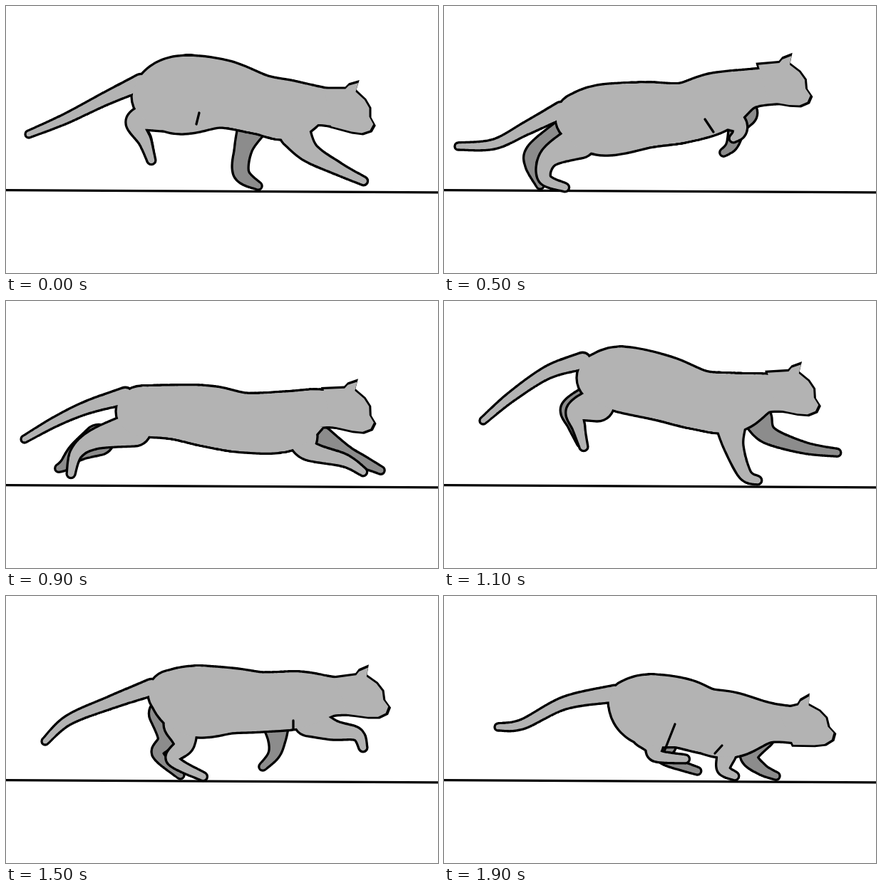
Animation of 606x375 px, one loop 2.2 s. Source, as an HTML page with a canvas:

```html
<!DOCTYPE html>
<html lang="en">
<head>
<meta charset="utf-8">
<title>Running cat</title>
<style>
html, body { margin: 0; width: 100%; height: 100%; overflow: hidden; background: #fff; }
canvas { display: block; }
</style>
</head>
<body>
<canvas id="stage" width="606" height="375"></canvas>
<script>
const STEP = 100, LAST = 1900, LOOP = 2200, HALF_LINE = 1.65;
const COAT = '#b3b3b3', SHADE = '#8c8c8c';

// Half thickness of each part at its joints; a joint may carry its own as a third value.
const HIND = [24, 14, 9, 6], FORE = [22, 14, 9, 6];
const THICKNESS = {
  trunk: [36, 50, 46, 42, 42, 28, 26],
  tail: [5, 7, 9, 12],
  hind: HIND,
  fore: FORE,
  farHind: HIND.map(r => r * 0.9),
  farFore: FORE.map(r => r * 0.9)
};

// Head profile around the skull centre: nape, ear, brow, nose, chin, jaw.
const HEAD = [[-35, -33], [-4, -33], [1, -38], [15, -42], [11, -29], [24, -17], [31, -5],
  [31, 8], [37, 19], [32, 28], [20, 32], [5, 30], [-25, 22]];

// Joints: trunk from rump to neck, tail from the tip, legs from the body to the toe.
// The head is x, y and tilt.
const landing = {
  trunk: [[216, 127, 40], [245, 125, 55], [300, 123, 48], [355, 138], [395, 146], [432, 140]],
  head: [480, 148, 0],
  tail: [[32, 180], [82, 159], [140, 130], [190, 107]],
  hind: [[220, 152], [182, 162], [195, 190], [204, 217]],
  fore: [[405, 178], [425, 205], [465, 228], [502, 246]],
  farHind: [[220, 152], [184, 162], [196, 188], [203, 212]],
  farFore: [[345, 170], [333, 200], [330, 235, 11], [354, 253]],
  folds: [[[267, 166], [271, 150]]]
};
const gathered = {
  trunk: [[228, 137, 30], [265, 133], [320, 138, 50], [372, 150, 45], [405, 155, 38], [440, 137]],
  head: [483, 132, -0.07],
  tail: [[43, 182], [85, 181], [140, 162], [205, 131]],
  hind: [[275, 170], [280, 205], [282, 224], [328, 249]],
  fore: [[365, 175], [345, 204], [325, 209], [301, 206]],
  farHind: [[260, 185], [256, 212], [254, 234], [305, 252]],
  farFore: [[365, 185], [346, 212], [332, 238], [345, 252]],
  folds: [[[306, 182], [299, 156]], [[327, 183], [321, 160]]]
};
const pushing = {
  trunk: [[192, 157], [225, 160], [285, 153], [335, 150], [380, 136], [425, 117]],
  head: [477, 111, -0.09],
  tail: [[20, 197], [70, 194], [115, 172], [165, 146]],
  hind: [[190, 190], [148, 212], [141, 242], [170, 255]],
  fore: [[390, 150], [413, 166, 12], [414, 178], [406, 186]],
  farHind: [[170, 180], [128, 204], [122, 224], [135, 252]],
  farFore: [[420, 150], [412, 168], [404, 195], [392, 206]],
  folds: [[[378, 177], [366, 159]]]
};
const stretched = {
  trunk: [[190, 155], [235, 156, 38], [285, 162, 43], [335, 171], [392, 169], [435, 152]],
  head: [480, 154, -0.04],
  tail: [[26, 194], [72, 168], [115, 149], [168, 133]],
  hind: [[180, 180], [125, 194], [99, 213], [91, 243]],
  fore: [[415, 190], [425, 210], [475, 224], [501, 240]],
  farHind: [[130, 195], [100, 212], [84, 229], [74, 235]],
  farFore: [[440, 195], [475, 215], [505, 228], [526, 238]],
  folds: []
};
const reaching = {
  trunk: [[222, 108], [250, 110, 46], [305, 122], [358, 139], [403, 143], [447, 130]],
  head: [489, 130, -0.06],
  tail: [[55, 168], [95, 134], [146, 100], [195, 84]],
  hind: [[215, 145], [185, 155], [189, 178], [196, 205]],
  fore: [[402, 170], [406, 203], [422, 243], [440, 252]],
  farHind: [[205, 140], [176, 152], [182, 175], [192, 200]],
  farFore: [[440, 165], [455, 188], [505, 206], [552, 213]],
  folds: []
};
const striding = {
  trunk: [[232, 137, 33], [265, 148], [315, 147], [360, 149], [412, 146, 40], [455, 141]],
  head: [499, 142, -0.13],
  tail: [[55, 204], [88, 174], [148, 149], [205, 128]],
  hind: [[245, 180], [250, 208], [234, 230], [277, 254]],
  fore: [[425, 175], [458, 188], [492, 194], [501, 213]],
  farHind: [[222, 165], [226, 200], [213, 222], [245, 252]],
  farFore: [[378, 175], [380, 200], [376, 222], [360, 240]],
  folds: [[[403, 186], [403, 175]]]
};
const crouched = {
  trunk: [[262, 149, 32], [288, 160], [330, 164, 49], [365, 175, 46], [402, 181, 46], [455, 178]],
  head: [508, 183, -0.24],
  tail: [[76, 184], [110, 180], [170, 150], [240, 137]],
  hind: [[285, 190], [294, 208], [298, 224], [339, 229]],
  fore: [[395, 205], [396, 222], [392, 243], [408, 253]],
  farHind: [[305, 206], [303, 215], [312, 230], [356, 246]],
  farFore: [[445, 195], [428, 224], [445, 243], [466, 253]],
  folds: [[[309, 218], [324, 180]], [[380, 221], [390, 210]]]
};

const keys = [
  [0, landing], [300, gathered], [500, pushing], [900, stretched], [1100, reaching],
  [1500, striding], [1600, stretched], [1700, reaching, 15], [LAST, crouched]
].map(([time, pose, shift = 0]) => ({ time, pose, shift }));

const ctx = document.getElementById('stage').getContext('2d');
ctx.lineCap = ctx.lineJoin = 'round';

const lerp = (a, b, u) => Array.isArray(a) ? a.map((v, i) => lerp(v, b[i], u)) : a + (b - a) * u;

const joints = (pose, part) => {
  const points = part === 'trunk' ? [...pose.trunk, pose.head.slice(0, 2)] : pose[part];
  return points.map(([x, y, r = THICKNESS[part][i_(points, x, y)]]) => [x, y, r]);
};
function i_(points, x, y) {
  return points.findIndex(p => p[0] === x && p[1] === y);
}

// Catmull-Rom value between p1 and p2.
const spline = (p0, p1, p2, p3, u) => p1 + u / 2 * (p2 - p0
  + u * (2 * p0 - 5 * p1 + 4 * p2 - p3 + u * (3 * (p1 - p2) + p3 - p0)));

// Fills a rounded limb by sweeping a circle along its joints.
function limb(points, grow, color) {
  const at = i => points[Math.max(0, Math.min(points.length - 1, i))];
  ctx.beginPath();
  for (let i = 0; i < points.length - 1; i++) {
    for (let u = 0; u <= 1; u += 1 / 40) {
      const [x, y, r] = [0, 1, 2].map(c =>
        spline(at(i - 1)[c], at(i)[c], at(i + 1)[c], at(i + 2)[c], u));
      ctx.moveTo(x + r + grow, y);
      ctx.arc(x, y, r + grow, 0, 2 * Math.PI);
    }
  }
  ctx.fillStyle = color;
  ctx.fill();
}

function line(points) {
  ctx.beginPath();
  points.forEach(([x, y]) => ctx.lineTo(x, y));
  ctx.lineWidth = 2 * HALF_LINE;
  ctx.stroke();
}

function head([x, y, tilt], grow, color) {
  ctx.save();
  ctx.translate(x, y);
  ctx.rotate(tilt);
  const scale = 1 + grow / 34;
  ctx.scale(scale, scale);
  ctx.beginPath();
  HEAD.forEach(([px, py]) => ctx.lineTo(px, py));
  ctx.closePath();
  ctx.fillStyle = color;
  ctx.fill();
  ctx.restore();
}

function draw(time) {
  const next = Math.max(1, keys.findIndex(k => k.time >= time));
  const a = keys[next - 1], b = keys[next], u = (time - a.time) / (b.time - a.time);
  const part = name => lerp(joints(a.pose, name), joints(b.pose, name), u);
  const skull = lerp(a.pose.head, b.pose.head, u);

  ctx.fillStyle = '#fff';
  ctx.fillRect(0, 0, 606, 375);
  line([[-4, 258.7], [610, 261.8]]);

  ctx.save();
  ctx.translate(lerp(a.shift, b.shift, u), 0);
  for (const name of ['farHind', 'farFore']) {
    limb(part(name), HALF_LINE, '#000');
    limb(part(name), -HALF_LINE, SHADE);
  }
  // All outlines first, then all fills, so that the near parts merge into one silhouette.
  for (const [grow, color] of [[HALF_LINE, '#000'], [-HALF_LINE, COAT]]) {
    for (const name of ['tail', 'hind', 'fore', 'trunk']) limb(part(name), grow, color);
    head(skull, grow, color);
  }
  (u < 0.5 ? a : b).pose.folds.forEach(line);
  ctx.restore();
}

let shown = -1;
function tick() {
  const time = Math.min(LAST, Math.floor(performance.now() % LOOP / STEP) * STEP);
  if (time !== shown) draw(shown = time);
  requestAnimationFrame(tick);
}
tick();
</script>
</body>
</html>
```
